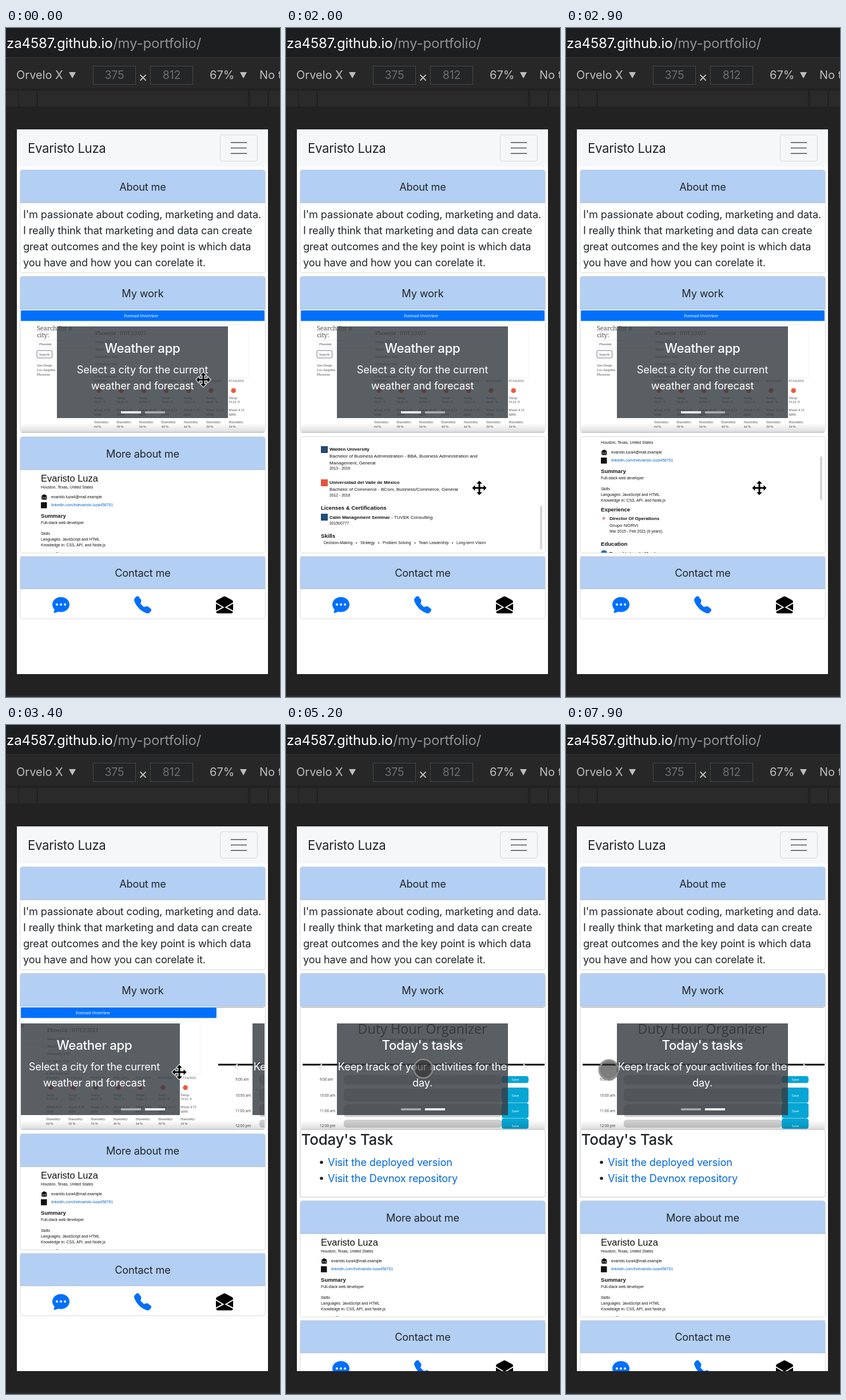
These frames come from a looping animation (479 px wide and 1168 px high, 8 s). An HTML page:

```html
<!DOCTYPE html>
<html lang="en">
<head>
<meta charset="utf-8">
<title>Portfolio on a phone</title>
<style>
html, body { margin: 0; width: 100%; height: 100%; overflow: hidden; background: #222; }
svg { display: block; }
text { font: 18.2px Inter, Roboto, sans-serif; letter-spacing: -.009em; fill: #212529; white-space: pre; }
.mid { text-anchor: middle; }
.end { text-anchor: end; }
.big { font-size: 22.2px; letter-spacing: -.015em; }
.med { font-weight: 500; }
.white { fill: #fff; }
.link { fill: #0069d9; }
.ui { font-size: 20px; fill: #bdbec0; letter-spacing: 0; }
.dim { font-size: 19.6px; fill: #6d6e70; }
.url { font-size: 24px; letter-spacing: -.005em; }
.path { fill: #8f9194; }
.cv text { font-family: "Liberation Sans", Arial, sans-serif; letter-spacing: 0; fill: #111; }
.cv .b { font-weight: 700; }
.cv .link { fill: #0a66c2; }
.serif text { font-family: "Noto Serif", serif; letter-spacing: -.02em; fill: #555; }
.sans text { font-family: "Open Sans", sans-serif; letter-spacing: 0; fill: #333; }
.serif .white, .sans .white { fill: #fff; }
.serif, .sans { filter: blur(.35px); }
</style>
</head>
<body>
<svg id="stage" width="479" height="1168" viewBox="0 0 479 1168"></svg>
<script>
(() => {
const LOOP = 8000, STEP = 100, SLIDE = 426, PANEL = 117;
const OWNER = 'Evaristo Luza';

const text = (x, y, s, cls = '', size = 0) =>
  `<text x="${x}" y="${y}" class="${cls}"${size ? ` style="font-size:${size}px"` : ''}>${s}</text>`;
const rect = (x, y, w, h, fill, more = '') =>
  `<rect x="${x}" y="${y}" width="${w}" height="${h}" fill="${fill}" ${more}/>`;
const line = (x1, x2, y, color, w = 1) =>
  `<path d="M${x1} ${y}H${x2}" stroke="${color}" stroke-width="${w}"/>`;
const clip = (id, x, y, w, h, r = 0) =>
  `<clipPath id="${id}">${rect(x, y, w, h, '#000', `rx="${r}"`)}</clipPath>`;
const icon = (x, y, size, color, d) =>
  `<path transform="translate(${x} ${y}) scale(${size / 16})" fill="${color}" d="${d}"/>`;

const CHAT = 'M16 8c0 3.87-3.58 7-8 7a9 9 0 0 1-2.35-.3c-.58.3-1.92.86-4.18 1.23-.2.03-.35-.18-.27-.36.35-.84.67-1.95.77-2.97C.74 11.37 0 9.76 0 8c0-3.87 3.58-7 8-7s8 3.13 8 7z';
const PHONE = 'M1.9.5a1.75 1.75 0 0 1 2.6.17L6.3 3c.33.42.44.97.31 1.49l-.55 2.19a.68.68 0 0 0 .18.64l2.46 2.46a.68.68 0 0 0 .64.18l2.19-.55a1.75 1.75 0 0 1 1.49.32l2.31 1.79c.83.64.9 1.87.16 2.61l-1.03 1.03c-.74.74-1.85 1.07-2.88.7a18.6 18.6 0 0 1-7.01-4.42A18.6 18.6 0 0 1 .15 4.43C-.2 3.4.12 2.3.86 1.55z';
const MAIL = 'M8.94.44a2 2 0 0 0-1.88 0l-6 3.2A2 2 0 0 0 0 5.4v.31l8 4.8 8-4.8V5.4a2 2 0 0 0-1.06-1.76zM16 6.87l-5.69 3.42L16 13.37zm-.06 7.64L8 10.2.06 14.5A2 2 0 0 0 2 16h12a2 2 0 0 0 1.94-1.5zM0 13.37l5.69-3.08L0 6.87z';
const CROSS = 'M0-12.5l5 5H1.5v6h6V-5l5 5-5 5V1.5h-6v6H5l-5 5-5-5h3.5v-6h-6V5l-5-5 5-5v3.5h6v-6H-5z';

const header = (y, label) => rect(25, y, 428, 57, '#b3cff3') + line(25, 453, y + 57, '#a4b9d3') +
  text(239, y + 35.5, label, 'mid');
const border = (y, h) => rect(24.5, y, 429, h, 'none', 'rx="4" stroke="#d9dbdd"');

function browser() {
  const box = (x, label) => rect(x + .5, 66.5, 74, 32, '#242526', 'stroke="#47484a"') +
    text(x + 37.5, 89, label, 'dim mid');
  const arrow = x => `<path d="M${x} 77h12l-6 11z" fill="#bdbec0"/>`;
  const ruler = [[0, 21], [23, 30], [56, 367], [427, 30], [460, 19]]
    .map(([x, w]) => rect(x, 110, w, 27, '#2a2a2b')).join('');
  return rect(0, 0, 479, 1168, '#222223') + rect(0, 0, 479, 51, '#1d1e20') + line(0, 479, 51.5, '#38393b') +
    rect(0, 52, 479, 54, '#272728') + line(0, 479, 106.5, '#1d1d1e') + ruler +
    text(186.5, 35, 'evaristoluza4587.github.io', 'url end white') + text(187, 35, '/my-portfolio/', 'url path') +
    text(18, 89, 'Orvelo X', 'ui') + arrow(110) + box(152, '375') + text(239.5, 94, '×', 'ui mid', 25) +
    box(252, '812') + text(356, 89, '67%', 'ui') + arrow(409) + text(443, 89, 'No throttling', 'ui') +
    line(0, 479, 1166.5, '#3b3b3c');
}

function intro() {
  const about = ["I'm passionate about coding, marketing and data.", 'I really think that marketing and data can create',
    'great outcomes and the key point is which data', 'you have and how you can corelate it.'];
  return rect(19, 177, 439, 951, '#fff') + rect(19, 177, 439, 65, '#f6f7f9') +
    text(38, 217.5, OWNER, 'big') +
    rect(374.5, 186.5, 65, 46, 'none', 'rx="4" stroke="#d4d6d8"') +
    [200, 209.5, 219].map(y => line(393, 421, y, '#77797b', 2)).join('') +
    header(248, 'About me') + about.map((s, i) => text(30, 331.5 + i * 28, s)).join('') + border(247.5, 180) +
    header(434, 'My work');
}

const caption = (title, ...rows) => rect(89, 521, 299, 160, '#343a40', 'opacity=".81"') +
  text(238.5, 566.5, title, 'big med white mid') +
  rows.map((s, i) => text(238.5, 603 + i * 28, s, 'white mid')).join('');

function weather() {
  let days = '';
  for (let i = 0; i < 7; i++) {
    const x = 154 + i * 39.2;
    days += `<circle cx="${x + 8.5}" cy="633" r="4.3" fill="#ee5b3c"/>`;
    [[618, `07/${8 + i}/2021`], [647.5, 'Temp:'], [655, `${73 + i * 5 % 14}.01 °F`],
      [669, `Wind: ${8 + i % 3}.73`], [677, 'MPH'], [690, 'Humidity:'], [698, `${64 - i * 5} %`]]
      .forEach(([y, s]) => days += text(x, y, s, '', 5.6));
  }
  const facts = ['Temp: 73.01 °F', 'Wind: 8.73 MPH', 'Humidity: 57%', 'UV Index: 7.10'];
  return rect(26, 492, SLIDE, 214, '#fff') + '<g class="serif">' + rect(26, 493, SLIDE, 18.5, '#0070fb') +
    text(236, 504.8, 'Forecast Overview', 'white mid', 7) +
    text(54, 528, 'Search for a', '', 11.2) + text(54, 540, 'city:', '', 11.2) +
    rect(54.5, 545.5, 96, 13, '#fff', 'stroke="#ececee"') + text(58, 553.5, 'Phoenix', '', 5.8) +
    rect(54, 563, 26.5, 13, '#fff', 'rx="2" stroke="#73778c"') + text(67, 571.5, 'Search', 'mid', 5.8) +
    ['San Diego', 'Los Angeles', 'Phoenix'].map((s, i) => text(54, 590.5 + i * 8, s, '', 6)).join('') +
    rect(150.5, 517.5, 273, 93, 'none', 'stroke="#f1f1f2"') +
    text(156, 536, 'Phoenix : 07/12/2021', '', 9.6) +
    facts.map((s, i) => text(156, 550 + i * 13, s, '', 5.8)).join('') +
    text(154, 610, '5-day Forecast:', '', 6) + days + '</g>' +
    caption('Weather app', 'Select a city for the current', 'weather and forecast');
}

function planner() {
  let rows = '';
  [[613, 12], [633, 26.5], [660, 26.5], [687, 18]].forEach(([y, h], i) => {
    const mid = [619, 647, 673.5, 700][i];
    rows += text(59, mid + 2.2, `${9 + i}:00 ${i < 3 ? 'a' : 'p'}m`, '', 6.3) +
      rect(101, y + (i ? 2 : -2), 276, i ? h - 4 : 17, '#d1d1d1', 'rx="5"') +
      rect(377, y, 47, h, '#06a6d4', 'rx="4"') + text(401, mid + 2, 'Save', 'white mid', 5.8);
  });
  const chevron = (x, d) => `<path d="M${x} 592l${d} 5 ${-d} 5" fill="none" stroke="#e4e4e4" stroke-width="2"/>`;
  return rect(26, 492, SLIDE, 214, '#fff') + '<g class="sans">' + line(26, 452, 493, '#8f8f8f') +
    text(238.5, 539, 'Duty Hour Organizer', 'mid', 23.4) +
    text(238.5, 552, 'A simple calendar app for scheduling your day', 'mid', 7) +
    line(29, 452, 593, '#0c0c0c', 3) + rows + '</g>' + chevron(63, -5) + chevron(415, 5) +
    caption("Today's tasks", 'Keep track of your activities for the', 'day.');
}

function carousel() {
  return `<g clip-path="url(#work)"><g id="first">${weather()}</g><g id="second">${planner()}</g>` +
    rect(26, 690, SLIDE, 15, 'url(#shade)') + rect(201, 669.2, 35, 3.6, '#fff', 'id="dot1"') +
    rect(243, 669.2, 35, 3.6, '#fff', 'id="dot2"') + '</g>' +
    rect(24.5, 433.5, 429, 272, 'none', 'rx="4" stroke="#d3d4d6"') + line(27, 451, 706, '#cbccce', 2);
}

function drawer() {
  const item = (y, s) => `<circle cx="62" cy="${y - 6}" r="2.8" fill="#212529"/>` + text(73, y, s, 'link');
  return '<g clip-path="url(#drawer)">' + text(26.5, 733, "Today's Task", 'med', 26) +
    item(769.5, 'Visit the deployed version') + item(797.5, 'Visit the Devnox repository') +
    '<rect id="edge" x="24.5" y="705.5" width="429" fill="none" rx="4" stroke="#d0d2d4" stroke-width="1.5"/></g>';
}

function resume() {
  // Each row: x, vertical centre, style letter, words.
  const sizes = { n: 16.5, h: 9.6, t: 8.1, m: 8.1, s: 6.8, l: 6.8 };
  const rows = `61 786 n ${OWNER}
61 802 s Houston, Texas, United States
79 819 s evaristo.luza4@mail.example
79 833 l linkedin.com/in/evaristo-luza458791
61 852 h Summary
61 864 s Full-stack web developer
61 883 s Skills
61 893 s Languages: JavaScript and HTML
61 903 s Knowledge in: CSS, API, and Node.js
61 919 h Experience
76 934 t Director Of Operations
76 946 m Grupo NORVI
76 957 s Mar 2015 - Feb 2021 (6 years)
61 979 h Education
76 995 t Tecnológico de Monterrey
76 1006 m Certificate Program, Logistics and Supply Chain Management
76 1017 s 2015 - 2015
76 1041 t Walden University
76 1053 m Bachelor of Business Administration - BBA, Business Administration and
76 1065 m Management, General
76 1075 s 2013 - 2016
76 1099 t Universidad del Valle de México
76 1111 m Bachelor of Commerce - BCom, Business/Commerce, General
76 1122 s 2012 - 2016
61 1144 h Licenses &amp; Certifications
76 1160 t Calm Management Seminar <tspan font-weight="400">- TUVEK Consulting</tspan>
76 1171 s 201500777
61 1193 h Skills
66 1205 s Decision-Making   •   Strategy   •   Problem Solving   •   Team Leadership   •   Long-term Vision`;
  const words = rows.split('\n').map(row => {
    const [, x, y, k, s] = row.match(/(\d+) (\d+) (\w) (.*)/);
    const cls = k === 'l' ? 'link' : 'ht'.includes(k) ? 'b' : '';
    return text(x, +y + sizes[k] * .35, s, cls, sizes[k]);
  }).join('');
  return `<g clip-path="url(#card)"><g id="scroll"><g class="cv">${words}</g>` +
    icon(62, 814, 9.5, '#111', MAIL) + rect(61, 828, 10.5, 10.5, '#111') +
    '<circle cx="66" cy="934" r="2.5" fill="#d99a9a"/><circle cx="66.5" cy="995" r="5.5" fill="#2f6db0"/>' +
    rect(61, 1036, 12, 12, '#27496d') + rect(61, 1094, 12, 12, '#e4573d') + rect(61, 1154, 12, 12, '#1f4d80') +
    header(714, 'More about me') + '</g>' +
    '<rect id="thumb" x="444" width="4" height="76" rx="1.5" fill="#d6d6d6"/></g>' + border(713.5, 203);
}

function contact() {
  return header(922, 'Contact me') + border(922.5, 109) + icon(81, 991.5, 30, '#0070fb', CHAT) +
    [89, 96, 103].map(x => `<circle cx="${x}" cy="1006.5" r="2" fill="#fff"/>`).join('') +
    icon(224, 992, 30, '#0070fb', PHONE) + icon(367, 992, 30, '#000', MAIL);
}

const stage = document.getElementById('stage');
stage.innerHTML = '<defs>' + clip('phone', 19, 177, 439, 951) + clip('work', 26, 492, SLIDE, 213, 3) +
  clip('card', 25, 714, 428, 202, 4) +
  '<clipPath id="drawer"><rect id="open" x="24" y="705" width="430"/></clipPath>' +
  '<linearGradient id="shade" x2="0" y2="1"><stop stop-opacity="0"/><stop offset="1" stop-opacity=".13"/></linearGradient></defs>' +
  browser() + `<g clip-path="url(#phone)">${intro()}${carousel()}${drawer()}<g id="below">${resume()}${contact()}</g></g>` +
  `<path id="cross" d="${CROSS}" stroke="#fff" stroke-width="2.4" paint-order="stroke" stroke-linejoin="round"/>` +
  '<g id="touch"><circle r="19" fill="#222" opacity=".25"/><circle r="16" fill="#343434" opacity=".5"/>' +
  '<circle r="16.5" fill="none" stroke="#8c8c8c" stroke-width="3" opacity=".85"/></g>';

const set = (id, name, value) => stage.querySelector('#' + id).setAttribute(name, value);
const move = (id, x, y) => set(id, 'transform', `translate(${x} ${y})`);
const unit = v => Math.max(0, Math.min(1, v));
const smooth = v => { v = unit(v); return v * v * (3 - 2 * v); };

// Interpolates rows of [time, value].
function track(keys, t, ease) {
  const i = keys.findIndex(k => k[0] > t);
  if (i < 0) return keys[keys.length - 1][1];
  if (!i) return keys[0][1];
  const [a, from] = keys[i - 1], [b, to] = keys[i];
  return from + (to - from) * ease((t - a) / (b - a));
}

const SCROLL = [[700, 0], [1300, 106], [1900, 306], [2500, 306], [2900, 78], [3050, 0]];
const X = [[200, 345], [700, 338], [3000, 338], [3300, 303], [4100, 303], [4600, 240], [5800, 240], [7300, 75]];
const Y = [[200, 614], [700, 803], [3000, 803], [3300, 606], [4100, 606], [4600, 600], [5800, 600], [7300, 602]];

function draw(t) {
  const scroll = track(SCROLL, t, unit);
  move('scroll', 0, -scroll);
  set('thumb', 'y', 718 + scroll * .38);
  set('thumb', 'opacity', t <= 700 ? 0 : 1 - unit((t - 3100) / 300));

  const slide = smooth((t - 3229) / 600);
  move('first', -SLIDE * slide, 0);
  move('second', SLIDE * (1 - slide), 0);
  set('dot1', 'opacity', slide ? .5 : 1);
  set('dot2', 'opacity', slide ? 1 : .5);

  const open = PANEL * smooth((t - 4700) / 350);
  set('open', 'height', open ? open + 3 : 0);
  set('edge', 'height', open + 2);
  move('below', 0, open);

  const x = track(X, t, smooth), y = track(Y, t, smooth), touching = t >= 4600;
  move('cross', x, y);
  move('touch', x, y);
  set('cross', 'visibility', touching ? 'hidden' : 'visible');
  set('touch', 'visibility', touching ? 'visible' : 'hidden');
}

function tick() {
  draw(Math.floor(performance.now() % LOOP / STEP) * STEP);
  requestAnimationFrame(tick);
}
tick();
})();
</script>
</body>
</html>
```
